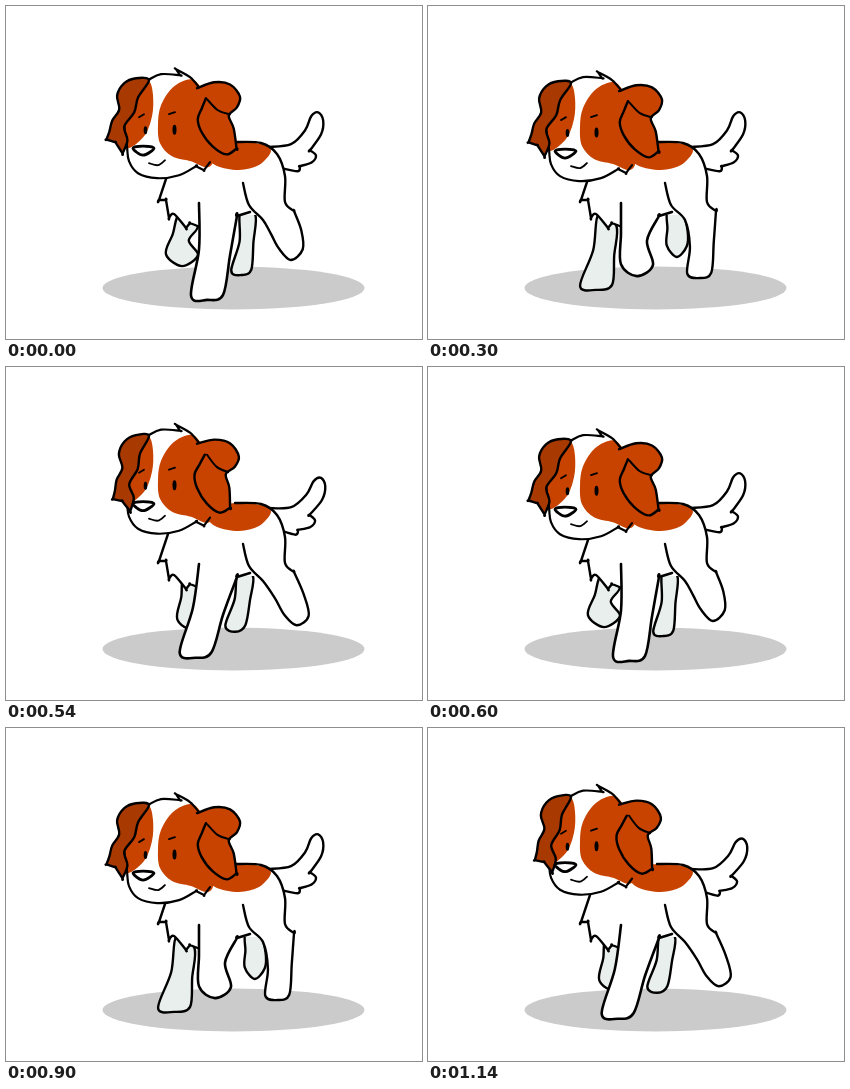
An HTML page with a canvas that plays this animation: 416 by 333 pixels, repeating every 1.2 s.

```html
<!DOCTYPE html>
<html lang="en">
<head>
<meta charset="utf-8">
<title>Walking puppy</title>
<style>
html, body { margin: 0; width: 100%; height: 100%; overflow: hidden; background: #fff; }
canvas { display: block; }
</style>
</head>
<body>
<canvas id="stage" width="416" height="333"></canvas>
<script>
const ctx = document.getElementById('stage').getContext('2d');
const STEP = 60, STEPS = 10;
const ORANGE = '#c84300', DARK = '#a83900', SHADE = '#e8efed', WHITE = '#fff', INK = '#000';

// Points "x,y"; "!" doubles a point, which makes a corner.
const points = text => text.split(' ').flatMap(token => {
  const p = token.replace('!', '').split(',').map(Number);
  return token.endsWith('!') ? [p, p] : [p];
});

const tail = points('262,141 285,138 299,124 305,110 312,106 317,114 315,128 304,144! 310,149 306,156 294,160! 292,165 275,162');
const torso = points('165,160! 200,150! 262,145! 272,180! 254,209! 231,209! 195,220! 170,205!');
const saddle = points('202,150 214,139 231,136 255,138 265,145 253,159 233,164 211,160');
const chest = points('163,164 153,194! 160,194! 163,212! 168,208 180,222! 184,217! 194,221');
const face = points('204,158 198,166! 190,162! 173,171 151,174 132,169 123,157 121,142 118,112 126,86 142,76 155,70 174,71! 170,65! 184,73 193,83');
const leftPatch = points('143,77 147,91 146,112 138,132 121,144 116,127 123,99 133,83');
const leftEar = points('143,76 130,74 118,79 111,91 113,105 106,116 103,127 100,135! 109,138! 116,149! 121,136 118,122 128,108 132,93');
const rightPatch = points('184,75 167,83 155,101 152,120 154,139 166,152 185,157 202,163 208,150 206,104 194,82');
const rightEar = points('191,84 208,78 224,80 234,92 231,103 223,111 228,124 231,144! 221,150 207,142 196,128 192,115 196,104 200,94');
const fold = points('201,95 212,106 224,110');
const nose = points('127,144 137,142 148,144 137,151');
const mouth = points('143,159 152,161 159,156');
const brows = [points('133,113 138,110'), points('163,110 169,108')];

// x, y: middle of the foot's loop; front, back: lines from the body down to and up from the foot.
const fore = { reach: 21, farthest: 2.8, rise: 12, lowest: 0.2, half: 16, bend: 9 };
const rear = { reach: 14, farthest: 8.3, rise: 10, lowest: 5.7, half: 12, bend: -3 };
const legs = {
  nearFront: { ...fore, x: 205, y: 282, front: points('193,197'), back: points('231,210! 244,206') },
  farFront: { ...fore, x: 172, y: 272, far: true, front: points('172,208'), back: points('190,220') },
  nearHind: {
    ...rear, x: 278, y: 263, front: points('237,177 243,199 257,214'),
    back: points('288,205! 279,196 279,170 271,148 255,137 229,136')
  },
  farHind: { ...rear, x: 242, y: 260, half: 10, far: true, front: points('237,206'), back: points('252,209') }
};

const wave = (step, peak, period) => Math.cos(2 * Math.PI * (step - peak) / period);
const middle = (a, b, dx) => [(a[0] + b[0]) / 2 + dx, (a[1] + b[1]) / 2];

// The foot runs round an oval; the far legs are half a cycle behind.
function leg(part, step) {
  const s = part.far ? step + STEPS / 2 : step;
  const forward = part.reach * wave(s, part.farthest, STEPS);
  const down = wave(s, part.lowest, STEPS);
  const lift = (1 - down) / 2;
  const swing = part.far ? 0.4 * forward : 0;
  const shift = pts => pts.map(([x, y]) => [x + swing, y]);
  const front = shift(part.front), back = shift(part.back);
  const x = part.x + forward, y = part.y + part.rise * down;
  const toe = [x - part.half, y - 4 - 8 * lift];
  const heel = [x + part.half, y - 5 - 6 * lift];
  const knee = middle(front.at(-1), toe, 4 * (1 - lift));
  const hock = middle(heel, back[0], -part.bend * lift);
  return [...front, knee, toe, [x, y], heel, hock, ...back];
}

function rotate(pts, degrees) {
  const [ox, oy] = pts[0], a = degrees * Math.PI / 180;
  const c = Math.cos(a), s = Math.sin(a);
  return pts.map(([x, y]) => [
    ox + (x - ox) * c - (y - oy) * s,
    oy + (x - ox) * s + (y - oy) * c]);
}

// Smooth curve through the points.
function trace(pts, closed) {
  const n = pts.length;
  const at = i => closed ? pts[(i + n) % n] : pts[Math.max(0, Math.min(n - 1, i))];
  ctx.beginPath();
  ctx.moveTo(...pts[0]);
  for (let i = 0; i < (closed ? n : n - 1); i++) {
    const [p, q, r, s] = [at(i - 1), at(i), at(i + 1), at(i + 2)];
    ctx.bezierCurveTo(
      q[0] + (r[0] - p[0]) / 6, q[1] + (r[1] - p[1]) / 6,
      r[0] - (s[0] - q[0]) / 6, r[1] - (s[1] - q[1]) / 6, r[0], r[1]);
  }
  if (closed) ctx.closePath();
}

function paint(pts, fill, width, closed) {
  trace(pts, closed);
  if (fill) {
    ctx.fillStyle = fill;
    ctx.fill();
  }
  if (width) {
    ctx.lineWidth = width;
    ctx.stroke();
  }
}

function oval(x, y, rx, ry, fill) {
  ctx.fillStyle = fill;
  ctx.beginPath();
  ctx.ellipse(x, y, rx, ry, 0, 0, 2 * Math.PI);
  ctx.fill();
}

function drawBody(step, bounce) {
  const hind = leg(legs.nearHind, step);
  paint(leg(legs.farHind, step), SHADE, 2.4, true);
  paint(leg(legs.farFront, step), SHADE, 2.4, true);
  paint(rotate(tail, 10 * bounce), WHITE, 2.4);
  paint(torso, WHITE, 0, true);
  paint(hind, WHITE);
  paint(saddle, ORANGE, 0, true);
  paint(hind, null, 2.4);
  paint(chest, WHITE, 2.4);
  paint(leg(legs.nearFront, step), WHITE, 2.6);
}

function drawHead(step, bounce) {
  ctx.save();
  ctx.translate(0, -10 * bounce - 2 * wave(step, -1.2, STEPS));
  paint(face, WHITE);
  paint(leftPatch, ORANGE, 0, true);
  paint(rightPatch, ORANGE, 0, true);
  paint(face, null, 2.2);
  paint(rotate(leftEar, -12 * bounce), DARK, 2.4, true);
  paint(rotate(rightEar, 12 * bounce), ORANGE, 2.4);
  paint(rotate(fold, 12 * bounce), null, 2);
  oval(139.5, 126, 1.8, 4, INK);
  oval(168.5, 125.5, 2, 5, INK);
  for (const brow of brows) paint(brow, null, 1.8);
  paint(nose, WHITE, 2.8, true);
  paint(mouth, null, 1.8);
  ctx.restore();
}

function draw(step) {
  const bounce = (1 + wave(step, 2.8, STEPS / 2)) / 2;
  ctx.fillStyle = WHITE;
  ctx.fillRect(0, 0, 416, 333);
  oval(227.5, 282, 131, 21.5, '#cbcbcb');
  ctx.strokeStyle = INK;
  ctx.lineCap = ctx.lineJoin = 'round';
  drawBody(step, bounce);
  drawHead(step, bounce);
}

function tick() {
  draw(Math.floor(performance.now() / STEP) % STEPS);
  requestAnimationFrame(tick);
}
tick();
</script>
</body>
</html>
```
